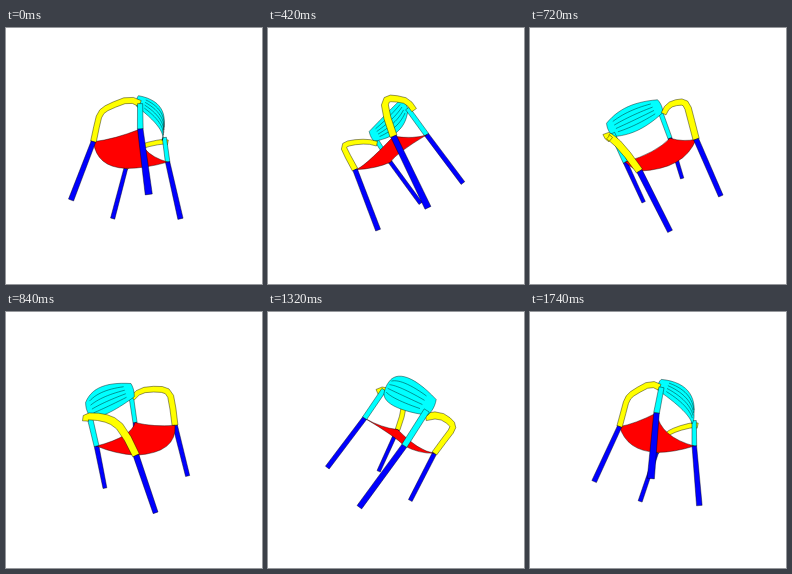
An HTML page with a canvas that plays this animation: 256 by 256 pixels, repeating every 1.8 s.

```html
<!DOCTYPE html>
<html>
<head>
<meta charset="utf-8">
<style>
  html, body { margin: 0; height: 100%; overflow: hidden; background: #fff; }
  canvas { display: block; width: 100vmin; height: 100vmin; }
</style>
</head>
<body>
<canvas id="stage"></canvas>
<script>
const LOOP = 1800, STEP = 60, SIZE = 256, DIST = 190;
const BLUE = '#00f', RED = '#f00', YELLOW = '#ff0', CYAN = '#0ff';
const canvas = document.getElementById('stage');
const ctx = canvas.getContext('2d');

// Tilted chair frame: side, back and up axes (screen y points down).
const ORIGIN = [-2.3, -11, -4.1];
const SIDE = [.521, .475, -.709], BACK = [.84, -.138, .525], UP = [.151, -.869, -.471];

let sin = 0, cos = 1;

function project([a, b, h]) {
  const [x, y, z] = ORIGIN.map((o, i) => o + a * SIDE[i] + b * BACK[i] + h * UP[i]);
  const depth = z * cos - x * sin;
  const k = DIST / (DIST - depth);
  return { x: 128 + (z * sin + x * cos) * k, y: 135 + y * k, k, depth };
}

const range = (n, f) => Array.from({ length: n + 1 }, (_, i) => f(i / n));
const mirror = (points, side) => points.map(([a, b, h]) => [a * side, b, h]);

function trace(points) {
  ctx.beginPath();
  points.forEach(p => ctx.lineTo(p.x, p.y));
}

function paint(color) {
  ctx.closePath();
  ctx.fillStyle = color;
  ctx.fill();
  ctx.stroke();
}

// A bar of the given thickness that follows the projected points.
function ribbon(points, width, color) {
  const line = points.map(project), left = [], right = [];
  line.forEach((p, i) => {
    const from = line[Math.max(i - 1, 0)], to = line[Math.min(i + 1, line.length - 1)];
    const dx = to.x - from.x, dy = to.y - from.y;
    const s = width * p.k / 2 / (Math.hypot(dx, dy) || 1);
    left.push({ x: p.x - dy * s, y: p.y + dx * s });
    right.unshift({ x: p.x + dy * s, y: p.y - dx * s });
  });
  trace(left.concat(right));
  paint(color);
}

function drawSeat() {
  const at = (...p) => project(p);
  const start = at(-29, -27, 0);
  ctx.beginPath();
  ctx.moveTo(start.x, start.y);
  [
    [at(0, -45, -11), at(29, -27, 0)],
    [at(29, 0, -4), at(29, 27, 0)],
    [at(0, 6, -2), at(-29, 27, 0)],
    [at(-29, 0, -4), start]
  ].forEach(([c, p]) => ctx.quadraticCurveTo(c.x, c.y, p.x, p.y));
  paint(RED);
}

// Bowed backrest surface: s runs across, t from bottom to top.
function restPoint(s, t) {
  const low = 24 + 6 * s * s, high = 50 - 6 * s * s;
  return [s * (29 + 6 * t * (1 - t)), 28 - 10 * s * s, low + (high - low) * t];
}

function drawRest() {
  const across = (t, reach = 1) => range(14, u => restPoint((2 * u - 1) * reach, t));
  const up = s => range(6, t => restPoint(s, t));
  const outline = [...across(0), ...up(1), ...across(1).reverse(), ...up(-1).reverse()];
  trace(outline.map(project));
  paint(CYAN);
  for (const t of [.24, .43, .62, .81]) {
    trace(across(t, .74).map(project));
    ctx.stroke();
  }
}

const frontLeg = [[29, -27, 0], [29.5, -32, -60]];
const backLeg = [[29, 27, 0], [29.5, 43, -59]];
const strut = [[29, 27, 0], [28, 21, 33]];
const arm = [[29, -27, 0], [31.5, -26, 16], [34, -24, 27], [35.5, -20, 31.5], [36, -14, 33.5],
             [36, -4, 34.5], [36, 8, 34.5], [34.5, 17, 32.5], [32, 24, 28]];

const parts = [
  { points: [[0, -27, -3], [0, 27, -3]], draw: drawSeat },
  { points: range(8, u => restPoint(2 * u - 1, .5)), draw: drawRest }
];
for (const side of [-1, 1]) {
  for (const [shape, width, color] of [
    [frontLeg, 4.6, BLUE], [backLeg, 4.6, BLUE], [strut, 4.8, CYAN], [arm, 5.7, YELLOW]
  ]) {
    const points = mirror(shape, side);
    parts.push({ points, draw: () => ribbon(points, width, color) });
  }
}

const meanDepth = points => points.reduce((sum, p) => sum + project(p).depth, 0) / points.length;

function render(now) {
  const pixels = Math.round(Math.min(innerWidth, innerHeight) * devicePixelRatio);
  if (canvas.width !== pixels) canvas.width = canvas.height = pixels;
  ctx.setTransform(pixels / SIZE, 0, 0, pixels / SIZE, 0, 0);
  ctx.fillStyle = '#fff';
  ctx.fillRect(0, 0, SIZE, SIZE);
  ctx.strokeStyle = 'rgba(0, 0, 0, .7)';
  ctx.lineWidth = .6;
  ctx.lineJoin = 'round';

  const time = Math.floor(now % LOOP / STEP) * STEP;
  const angle = time / LOOP * 2 * Math.PI;
  sin = Math.sin(angle);
  cos = Math.cos(angle);

  // Far parts first.
  parts.map(part => ({ part, depth: meanDepth(part.points) }))
    .sort((p, q) => p.depth - q.depth)
    .forEach(({ part }) => part.draw());
}

let start;
function tick(now) {
  start ??= now;
  render(now - start);
  requestAnimationFrame(tick);
}
render(0);
requestAnimationFrame(tick);
</script>
</body>
</html>
```
